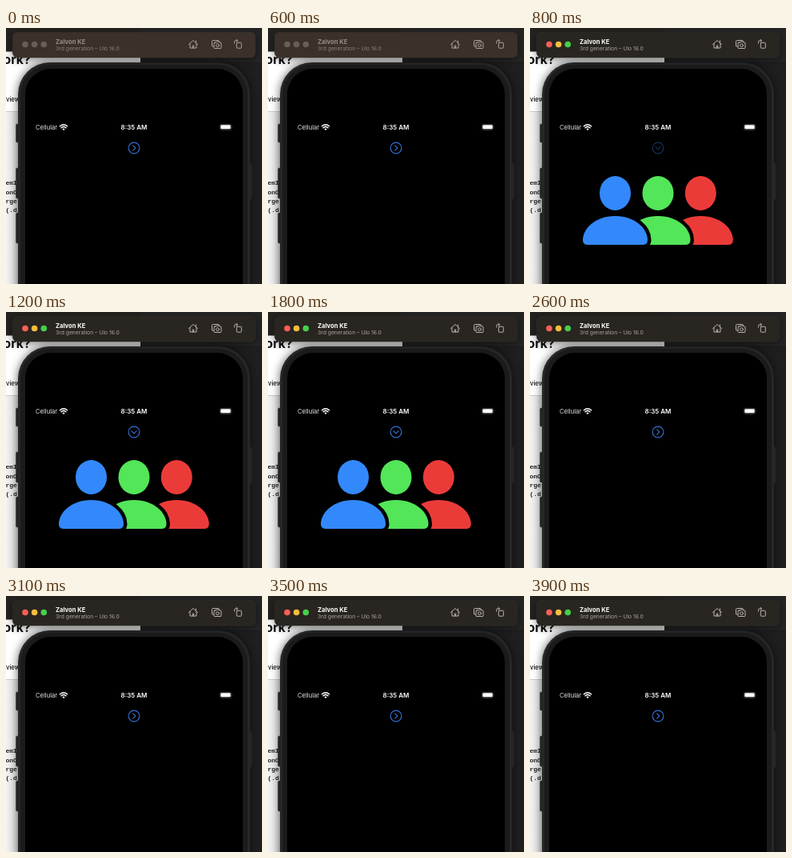
An HTML page that plays this animation: 320x320 px, repeating every 4000 ms.

```html
<!DOCTYPE html>
<html lang="en">
<head>
<meta charset="utf-8">
<title>Disclosure toggle in a phone simulator</title>
<style>
  html, body { margin: 0; width: 100%; height: 100%; overflow: hidden; background: #1f1f1f; }
  svg { display: block; width: 100%; height: 100%; }
  text { font-family: Inter, sans-serif; }
  .code text { font: bold 8px "Liberation Mono", monospace; fill: #222; }
  .line { fill: none; stroke-linecap: round; stroke-linejoin: round; }
</style>
</head>
<body>
<svg viewBox="0 0 320 320">
  <defs>
    <filter id="soft" x="-20%" y="-60%" width="140%" height="220%"><feGaussianBlur stdDeviation="6"/></filter>
    <linearGradient id="pane">
      <stop stop-color="#f2f2f2"/><stop offset="1" stop-color="#dcdcdc"/>
    </linearGradient>
    <g id="person">
      <ellipse cy="206.5" rx="19.5" ry="21.5"/>
      <path d="M-34 271Q-40.500 271-40.500 265C-40.500 251-25 235 0 235S40.500 251 40.500 265Q40.500 271 34 271Z"
            stroke="#000" stroke-width="9" paint-order="stroke"/>
    </g>
  </defs>

  <!-- Desktop -->
  <rect width="320" height="320" fill="#1f1f1f"/>
  <rect x="168" width="152" height="41" fill="#252526"/>
  <path d="M168 41.500H320" stroke="#2a2a2a"/>
  <rect width="168" height="320" fill="#fff"/>
  <rect width="168" height="29.500" fill="#252320"/>
  <rect y="105" width="17" height="215" fill="url(#pane)"/>
  <path d="M0 104.500H20" stroke="#c8c8c8"/>
  <text x="-3.500" y="45" font-size="15.800" font-weight="700" fill="#111">ork?</text>
  <text x="0" y="91.500" font-size="7.700" font-weight="500" fill="#111">view</text>
  <g class="code">
    <text x="-.5" y="196">emI</text>
    <text x="-.5" y="207.500">onO</text>
    <text x="-.5" y="218.500">rge</text>
    <text x="-.5" y="230">(.d</text>
  </g>

  <!-- Phone -->
  <rect x="15" y="43" width="290" height="340" rx="40" opacity=".6" filter="url(#soft)"/>
  <g fill="#242424" stroke="#303030" stroke-width=".5">
    <rect x="12.500" y="120" width="5" height="23" rx="1.500"/>
    <rect x="12.500" y="175" width="5" height="38" rx="1.500"/>
    <rect x="12.500" y="231" width="5" height="38" rx="1.500"/>
    <rect x="302.500" y="169" width="4.500" height="45" rx="1.500"/>
  </g>
  <rect x="15" y="43" width="290" height="340" rx="40" fill="#272727"/>
  <rect x="18" y="46" width="284" height="340" rx="37" fill="#1b1b1b"/>
  <rect x="24" y="51" width="272" height="340" rx="32"/>

  <!-- Status bar -->
  <g fill="#e6e6e6">
    <text x="37" y="126.800" font-size="7.600">Cellular</text>
    <text x="160" y="126.800" font-size="8" font-weight="600" text-anchor="middle" fill="#fff">8:35 AM</text>
    <path d="M72 128L70.300 126.200Q72 124.800 73.700 126.200Z" fill="#fff"/>
    <path class="line" d="M69 124.700Q72 122.100 75 124.700M67.400 122.700Q72 118.700 76.600 122.700" stroke="#fff" stroke-width="1.500" stroke-linecap="butt"/>
    <rect x="267.300" y="120.300" width="14.400" height="7" rx="2" fill="none" stroke="#666" stroke-width=".6"/>
    <rect x="268.300" y="121.300" width="12.400" height="5" rx="1.200" fill="#fff"/>
    <path d="M282.600 122.700q1 1.200 0 2.400z" fill="#777"/>
  </g>

  <g id="button" class="line" stroke="#3570d2" stroke-width="1.150">
    <circle cx="160" cy="150" r="6.900"/>
    <path id="chevron" d="M158.700 146.900L161.800 150L158.700 153.100"/>
  </g>
  <g id="people">
    <use href="#person" x="213.300" fill="#eb3b39"/>
    <use href="#person" x="160" fill="#53e659"/>
    <use href="#person" x="106.500" fill="#3389fb"/>
  </g>

  <!-- Simulator title bar -->
  <rect x="8" y="8" width="304" height="31" rx="6" opacity=".5" filter="url(#soft)"/>
  <rect id="bar" x="8.300" y="5.300" width="303.400" height="31.700" rx="6" stroke="#37322d" stroke-width=".5"/>
  <circle class="light" cx="24" cy="20.500" r="3.800"/>
  <circle class="light" cx="35.600" cy="20.500" r="3.800"/>
  <circle class="light" cx="47.300" cy="20.500" r="3.800"/>
  <text id="title" x="62" y="19.800" font-size="7.600" font-weight="700">Zalvon KE</text>
  <text id="subtitle" x="62" y="28" font-size="6.800">3rd generation – Ulo 16.0</text>
  <g id="tools" class="line" stroke-width="1">
    <path d="M228.500 20.500L234 15.500L239.500 20.500M230 19.500V25H238V19.500M237.500 16V18M233.300 22V25M234.700 22V25"/>
    <path d="M259.500 23H258Q257.500 23 257.500 22V16.500Q257.500 15.500 258.500 15.500H265.500Q266.500 15.500 266.500 17"/>
    <path d="M261 18H262.700L263.300 17H266L266.700 18H268.300Q269 18 269 19V24.500Q269 25.500 268 25.500H261Q260 25.500 260 24.500V19Q260 18 261 18Z"/>
    <circle cx="264.500" cy="21.700" r="1.900"/>
    <rect x="288.300" y="18.300" width="6" height="6.900" rx=".8"/>
    <path d="M285.500 19V17.500Q285.500 15.700 287.300 15.700H289.300M288 14.200L289.500 15.700L288 17.200"/>
  </g>
</svg>
<script>
  const LOOP = 4000, STEP = 100, OPEN = 800, FADED_IN = 1200, CLOSE = 2000;
  const byId = id => document.getElementById(id);
  const lights = [...document.querySelectorAll(".light")];
  const lightColors = ["#fb5f55", "#f6be3c", "#45d04c"];

  function draw(now) {
    const time = Math.floor(now % LOOP / STEP) * STEP;
    const active = time >= OPEN;
    const open = active && time < CLOSE;
    const fade = Math.min(1, (time - OPEN) / (FADED_IN - OPEN));

    byId("people").style.display = open ? "" : "none";
    byId("chevron").setAttribute("transform", `rotate(${open ? 90 : 0} 160 150)`);
    byId("button").setAttribute("opacity", open ? 0.45 + 0.55 * fade : 1);

    byId("bar").setAttribute("fill", active ? "#292520" : "#3b302a");
    byId("title").setAttribute("fill", active ? "#fff" : "#968d87");
    byId("subtitle").setAttribute("fill", active ? "#aaa4a0" : "#8a817b");
    byId("tools").setAttribute("stroke", active ? "#b8b2ad" : "#aaa29c");
    lights.forEach((light, i) => light.setAttribute("fill", active ? lightColors[i] : "#675e58"));
  }

  function tick() {
    draw(performance.now());
    requestAnimationFrame(tick);
  }
  tick();
</script>
</body>
</html>
```
